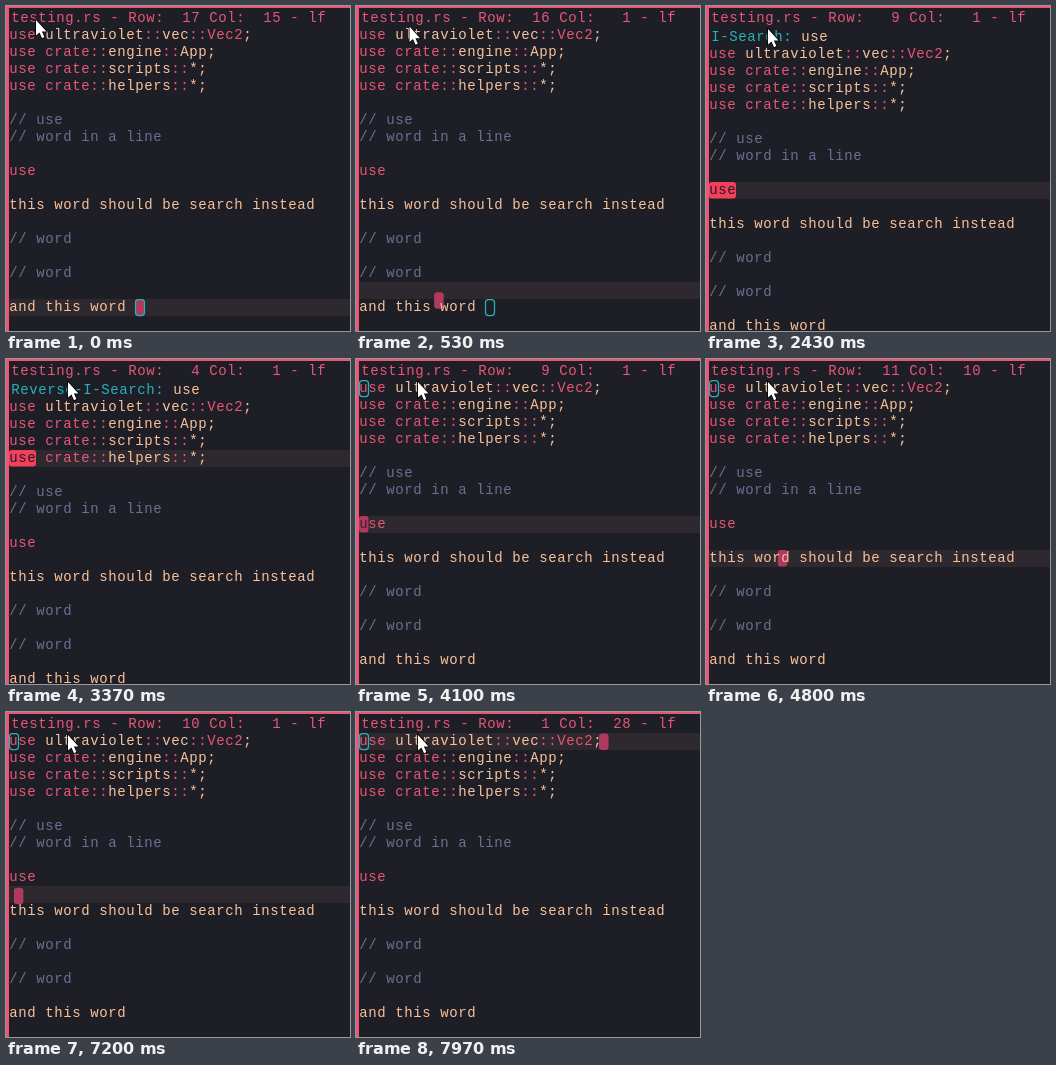
Recreate the animation shown at these times as an HTML page with a canvas. Size 344 by 325 pixels, loop 8 s.

```html
<!DOCTYPE html>
<html lang="en">
<head>
<meta charset="utf-8">
<title>Editor search</title>
<style>
  html, body { margin: 0; width: 100%; height: 100%; overflow: hidden; background: #1e1e26; }
  canvas { display: block; width: 344px; height: 325px; }
</style>
</head>
<body>
<canvas id="stage"></canvas>
<script>
const LOOP = 8000, W = 344, H = 325;
const CHAR = 9, ROW = 17, LEFT = 3, SEARCH_SHIFT = 19, GLIDE = 60;
const C = {
  bg: '#1e1e26', line: '#2d292f', red: '#e95678', text: '#fac29a',
  comment: '#6c6f93', teal: '#25b2bc', hit: '#f43e5c', cursor: '#b03a5e'
};

const lines = `use ultraviolet::vec::Vec2;
use crate::engine::App;
use crate::scripts::*;
use crate::helpers::*;

// use
// word in a line

use

this word should be search instead

// word

// word

and this word`.split('\n');

// A held Up key: one row per repeat.
const holdUp = (time, from, to) =>
  Array.from({ length: from - to + 1 }, (_, i) => [time + i * 33, from - i, 1]);

// Cursor stretches between searches; every key is [time, row, col].
const stretches = [
  [[0, 17, 15], ...holdUp(500, 16, 1), [1300, 1, 2]],
  [[3900, 9, 1], [4150, 10, 1], [4330, 11, 1], [4530, 11, 5], [4721, 11, 10], [5100, 11, 6]],
  [[6770, 11, 6], [7068, 10, 1], ...holdUp(7430, 9, 2), [7706, 1, 28]]
];

// Every hit is [time, row, col, reverse].
const searches = [
  { query: 'use', close: 3900, hits: [
    [1600, 1, 1], [1830, 2, 1], [2030, 3, 1], [2230, 4, 1], [2430, 9, 1],
    [2730, 4, 1, true], [2930, 9, 1], [3370, 4, 1, true], [3600, 9, 1]] },
  { query: 'word', close: 6770, hits: [
    [5500, 11, 6], [5630, 17, 10], [5970, 11, 6, true], [6230, 17, 10], [6400, 11, 6, true]] }
];

const MARK_TIME = 1100;
const canvas = document.getElementById('stage');
const ctx = canvas.getContext('2d');
const scale = window.devicePixelRatio || 1;
canvas.width = W * scale;
canvas.height = H * scale;

const colX = col => LEFT + (col - 1) * CHAR;
const rowY = row => 4 + row * ROW;
const latest = (events, t) => events.filter(e => e[0] <= t).pop();

// Glyphs sit centred in cells slightly wider than their own advance.
function text(str, x, baseline, color) {
  ctx.fillStyle = color;
  ctx.fillText(str, x + 0.3, baseline);
}

function roundBox(x, y, w, h, r) {
  ctx.beginPath();
  ctx.roundRect(x, y, w, h, r);
}

function drawLine(str, baseline) {
  if (str.startsWith('//')) return text(str, LEFT, baseline, C.comment);
  let x = LEFT;
  for (const part of str.split(/(\buse\b|\bcrate\b|::|Vec2)/)) {
    text(part, x, baseline, /^(use|crate|::|Vec2)$/.test(part) ? C.red : C.text);
    x += part.length * CHAR;
  }
}

// The drawn cursor trails its target with exponential smoothing.
function glide(keys, t) {
  let [, row, col] = keys[0];
  for (let i = 1; i < keys.length && keys[i][0] <= t; i++) {
    const k = 1 - Math.exp((keys[i][0] - t) / GLIDE);
    row += (keys[i][1] - keys[i - 1][1]) * k;
    col += (keys[i][2] - keys[i - 1][2]) * k;
  }
  return [colX(col), rowY(row)];
}

function drawCursor(keys, t) {
  const [x, y] = glide(keys, t);
  ctx.fillStyle = C.cursor;
  roundBox(x, y, CHAR + 0.5, 16.5, 3);
  ctx.fill();
}

function drawMark(t) {
  const [row, col] = t < MARK_TIME ? [17, 15] : [1, 1];
  ctx.strokeStyle = C.teal;
  ctx.lineWidth = 1.25;
  roundBox(colX(col) + 0.5, rowY(row) + 0.5, CHAR, 16, 3);
  ctx.stroke();
}

function drawPointer(t) {
  const p = Math.min(1, Math.max(0, (t - 200) / 500));
  const ease = p * p * (3 - 2 * p);
  ctx.save();
  ctx.translate(30 + 32 * ease, 14 + 9 * ease);
  const arrow = new Path2D('M0 0V15.5L3.5 12.4L6 18.2L8.4 17.1L5.9 11.6H10.5Z');
  ctx.strokeStyle = '#000';
  ctx.lineWidth = 1.5;
  ctx.stroke(arrow);
  ctx.fillStyle = '#fff';
  ctx.fill(arrow);
  ctx.restore();
}

function draw(t) {
  const search = searches.find(s => t >= s.hits[0][0] && t < s.close);
  const keys = stretches.filter(s => s[0][0] <= t).pop();
  const [, row, col, reverse] = latest(search ? search.hits : keys, t);
  const shift = search ? SEARCH_SHIFT : 0;
  const x = colX(col), y = rowY(row) + shift;

  ctx.setTransform(scale, 0, 0, scale, 0, 0);
  ctx.font = '14px "Liberation Mono", monospace';
  ctx.letterSpacing = '0.6px';
  ctx.fillStyle = C.bg;
  ctx.fillRect(0, 0, W, H);
  ctx.fillStyle = C.line;
  ctx.fillRect(LEFT, y, W - LEFT, ROW);
  ctx.fillStyle = C.red;
  ctx.fillRect(0, 0, LEFT, H);
  ctx.fillRect(0, 0, W, 2);

  const pad = n => String(n).padStart(4);
  text(`testing.rs - Row:${pad(row)} Col:${pad(col)} - lf`, 5, 16, C.red);

  if (!search) drawCursor(keys, t);
  lines.forEach((str, i) => drawLine(str, rowY(i + 1) + 12 + shift));

  if (search) {
    const label = (reverse ? 'Reverse-' : '') + 'I-Search: ';
    text(label, 5, 35, C.teal);
    text(search.query, 5 + label.length * CHAR, 35, C.text);
    ctx.fillStyle = C.hit;
    roundBox(x, y, search.query.length * CHAR, 16.5, 3);
    ctx.fill();
    text(search.query, x, y + 12, C.bg);
  } else {
    text(lines[row - 1][col - 1] || '', x, y + 12, C.bg);
    drawMark(t);
  }
  drawPointer(t);
}

const start = performance.now();
function tick() {
  draw((performance.now() - start) % LOOP);
  requestAnimationFrame(tick);
}
tick();
</script>
</body>
</html>
```
